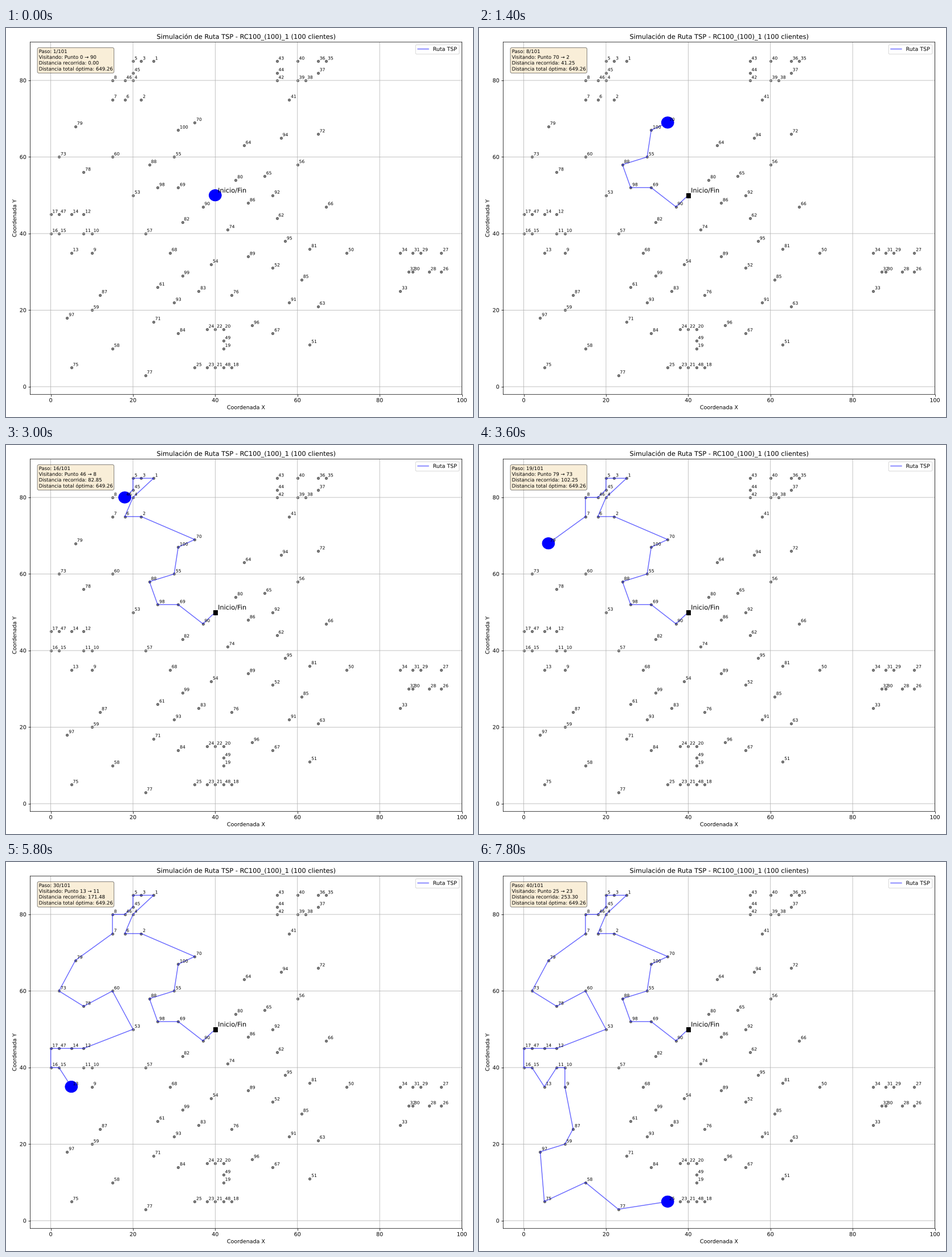
Recreate the animation shown at these times as a matplotlib script. Size 820 by 683 pixels, loop 8000 ms.

```python
import numpy as np
import matplotlib.pyplot as plt
from matplotlib.animation import FuncAnimation
from matplotlib.patheffects import Normal

W, H, DPI = 820, 683, 820 / 12
STEP_MS, TOTAL_STOPS, BEST = 200, 101, 649.26

# Clusters as {x: ys}; customers are numbered column by column
CLUSTERS = [
    {25: [85], 22: [75, 85], 20: [80, 85], 18: [75], 15: [75, 80]},
    {10: [35, 40], 8: [40, 45], 5: [35, 45], 2: [40], 0: [40, 45]},
    {44: [5], 42: [10, 15], 40: [5, 15], 38: [5, 15], 35: [5]},
    {95: [30, 35], 92: [30], 90: [35], 88: [30, 35], 87: [30], 85: [25, 35]},
    {67: [85], 65: [85, 82], 62: [80], 60: [80, 85], 58: [75],
     55: [80, 85, 82]},
]
EXTRAS = [(20, 82), (18, 80), (2, 45), (42, 5), (42, 12), (72, 35)]

# Lone customers along the route, in visiting order
LEG_NORTH = {90: (37, 47), 69: (31, 52), 98: (26, 52), 88: (24, 58),
             55: (30, 60), 100: (31, 67), 70: (35, 69)}
LEG_WEST = {79: (6, 68), 73: (2, 60), 78: (8, 56), 60: (15, 60), 53: (20, 50)}
LEG_SOUTH = {87: (12, 24), 59: (10, 20), 97: (4, 18), 75: (5, 5),
             58: (15, 10), 77: (23, 3)}


def place_points():
    spots = [(x, y) for c in CLUSTERS for x, ys in c.items() for y in ys]
    pos = dict(enumerate([(40, 50)] + spots + EXTRAS))
    pos |= LEG_NORTH | LEG_WEST | LEG_SOUTH
    rng = np.random.default_rng(7)
    for i in range(1, TOTAL_STOPS):
        if i not in pos:
            pos[i] = free_spot(rng, np.array(list(pos.values())))
    return pos


def free_spot(rng, taken):
    """Roomiest of a few random spots in the middle of the map."""
    c = rng.integers((20, 11), (68, 67), size=(24, 2))
    c = c[(c[:, 0] > 40) | (c[:, 1] < 44)]
    gap = np.hypot(*(c[:, None] - taken).transpose(2, 0, 1)).min(axis=1)
    return tuple(c[gap.argmax()])


def west_sweep(i):
    """Top row leftwards, then everything below it rightwards."""
    x, y = pos[i]
    return (0, -x, 0) if y == 45 else (1, x, -y)


pos = place_points()
north_loop = [2, 6, 4, 1, 3, 5, 45, 46, 8, 7]
west_loop = sorted([*range(9, 18), 47], key=west_sweep)
route = [0, *LEG_NORTH, *north_loop, *LEG_WEST, *west_loop, *LEG_SOUTH, 25, 23]
steps = len(route) - 1
rx, ry = np.array([pos[i] for i in route]).T
travelled = np.append(0, np.cumsum(np.hypot(np.diff(rx), np.diff(ry))))

# Outlined text and unsnapped lines keep sub-pixel positions
plt.rcParams.update({"font.family": "DejaVu Sans", "text.hinting": "none",
                     "path.snap": False, "path.effects": [Normal()]})

# a hair over W x H so that rounding never drops a pixel
fig, ax = plt.subplots(figsize=((W + 0.005) / DPI, (H + 0.005) / DPI), dpi=DPI)
fig.subplots_adjust(left=42.5 / W, right=800.5 / W,
                    bottom=1 - 643.3 / H, top=1 - 24.8 / H)
ax.set(xlim=(-5, 100), ylim=(-2, 90),
       xlabel="Coordenada X", ylabel="Coordenada Y",
       title="Simulación de Ruta TSP - RC100_(100)_1 (100 clientes)")
ax.grid(True)


def label(i, text, size, shift):
    ax.annotate(text, pos[i], xytext=(shift, shift),
                textcoords="offset points", fontsize=size)


customers = range(1, TOTAL_STOPS)
ax.scatter(*zip(*(pos[i] for i in customers)), c="black", s=20, alpha=0.5)
for i in customers:
    label(i, str(i), 8, 3)

path, = ax.plot([], [], "b-", alpha=0.6, lw=1.5, label="Ruta TSP")
ax.plot(*pos[0], "ks", ms=8, zorder=2.1)
label(0, "Inicio/Fin", 12, 5)

vehicle = plt.Circle(pos[0], 1.5, color="blue", zorder=2.5)
ax.add_patch(vehicle)
info = ax.text(0.02, 0.98, "", transform=ax.transAxes, va="top", fontsize=9,
               bbox=dict(boxstyle="round", facecolor="wheat", alpha=0.5))
ax.legend(loc="upper right")


def update(k):
    path.set_data(rx[:k + 1], ry[:k + 1])
    vehicle.center = rx[k], ry[k]
    info.set_text(f"Paso: {k + 1}/{TOTAL_STOPS}\n"
                  f"Visitando: Punto {route[k]} → {route[k + 1]}\n"
                  f"Distancia recorrida: {travelled[k]:.2f}\n"
                  f"Distancia total óptima: {BEST}")
    return path, vehicle, info


anim = FuncAnimation(fig, update, frames=steps, interval=STEP_MS,
                     init_func=lambda: update(0), repeat=True, repeat_delay=0)
plt.show()
```
